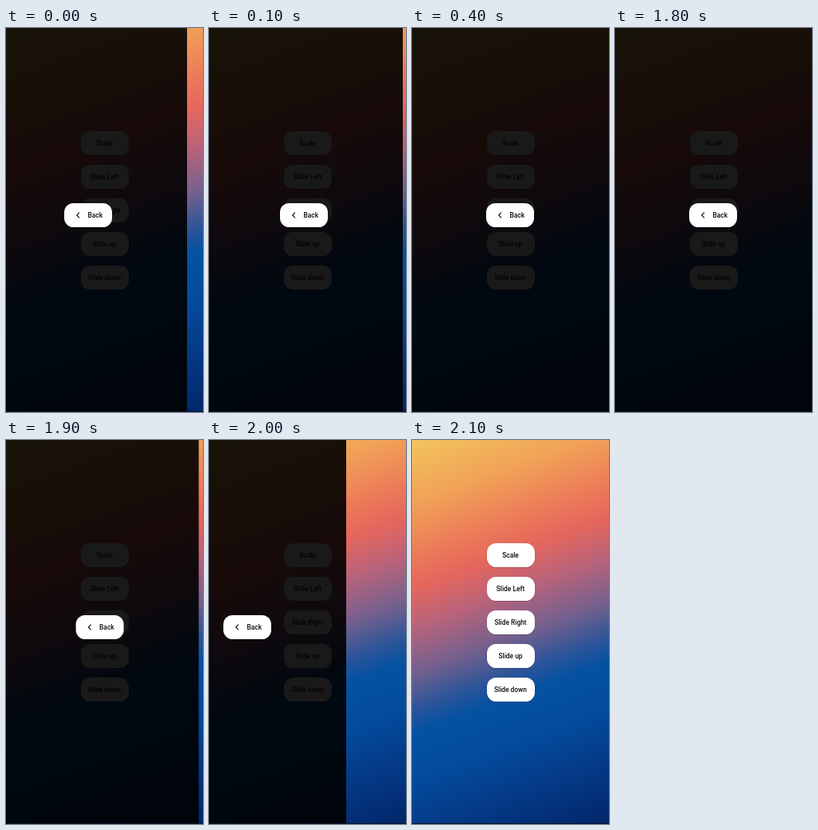
Recreate the animation shown at these times as an HTML page. Size 247x480 px, loop 3.1 s.

```html
<!DOCTYPE html>
<html lang="en">
<head>
<meta charset="utf-8">
<title>Slide transition</title>
<style>
  html, body { margin: 0; width: 100%; height: 100%; overflow: hidden; }
  .stage {
    position: relative; width: 247px; height: 480px; overflow: hidden;
    background: linear-gradient(160deg, #f2c45c 0, #f1a257 75px, #ec7a59 138px, #e5665d 175px,
      #b8637a 222px, #75608e 274px, #2f5598 315px, #0551a2 345px, #034b9c 400px, #053c89 455px, #01266a 535px);
  }
  .stage::after {
    content: ""; position: absolute; inset: auto 0 0; height: 1px; background: #08122a;
  }
  .btn {
    position: absolute; left: 93.5px; width: 60px; height: 30px; border-radius: 11.5px;
    background: #fff; color: #0c0c0c; box-shadow: 0 .5px 1px rgba(0, 0, 0, .35);
    font: 500 8.4px/30px Roboto, sans-serif; text-align: center; white-space: nowrap;
  }
  .panel {
    position: absolute; inset: 0; background: rgba(0, 0, 0, .9);
    animation: slide 3100ms step-end infinite;
  }
  .back { left: 93.3px; top: 218.7px; }
  .back span { position: absolute; left: 29.2px; }
  .back svg { position: absolute; left: 14px; top: 10px; }
  /* The slide advances in 100 ms ticks: a settling spring in, an accelerating exit. */
  @keyframes slide {
    0%      { transform: translateX(-20px); }
    3.225%  { transform: translateX(-4px); }
    6.451%  { transform: translateX(-1px); }
    9.677%  { transform: none; }
    61.29%  { transform: translateX(-5.4px); }
    64.516% { transform: translateX(-75px); }
    67.741%, 100% { transform: translateX(-250px); }
  }
</style>
</head>
<body>
<div class="stage">
  <div class="btn" style="top:128.5px">Scale</div>
  <div class="btn" style="top:170.5px">Slide Left</div>
  <div class="btn" style="top:212.5px">Slide Right</div>
  <div class="btn" style="top:254.5px">Slide up</div>
  <div class="btn" style="top:296.5px">Slide down</div>
  <div class="panel">
    <div class="btn back">
      <svg width="8" height="10" fill="none" stroke="#0c0c0c" stroke-width="1.1"><path d="M5 1.7 1.7 5 5 8.3"/></svg>
      <span>Back</span>
    </div>
  </div>
</div>
</body>
</html>
```
